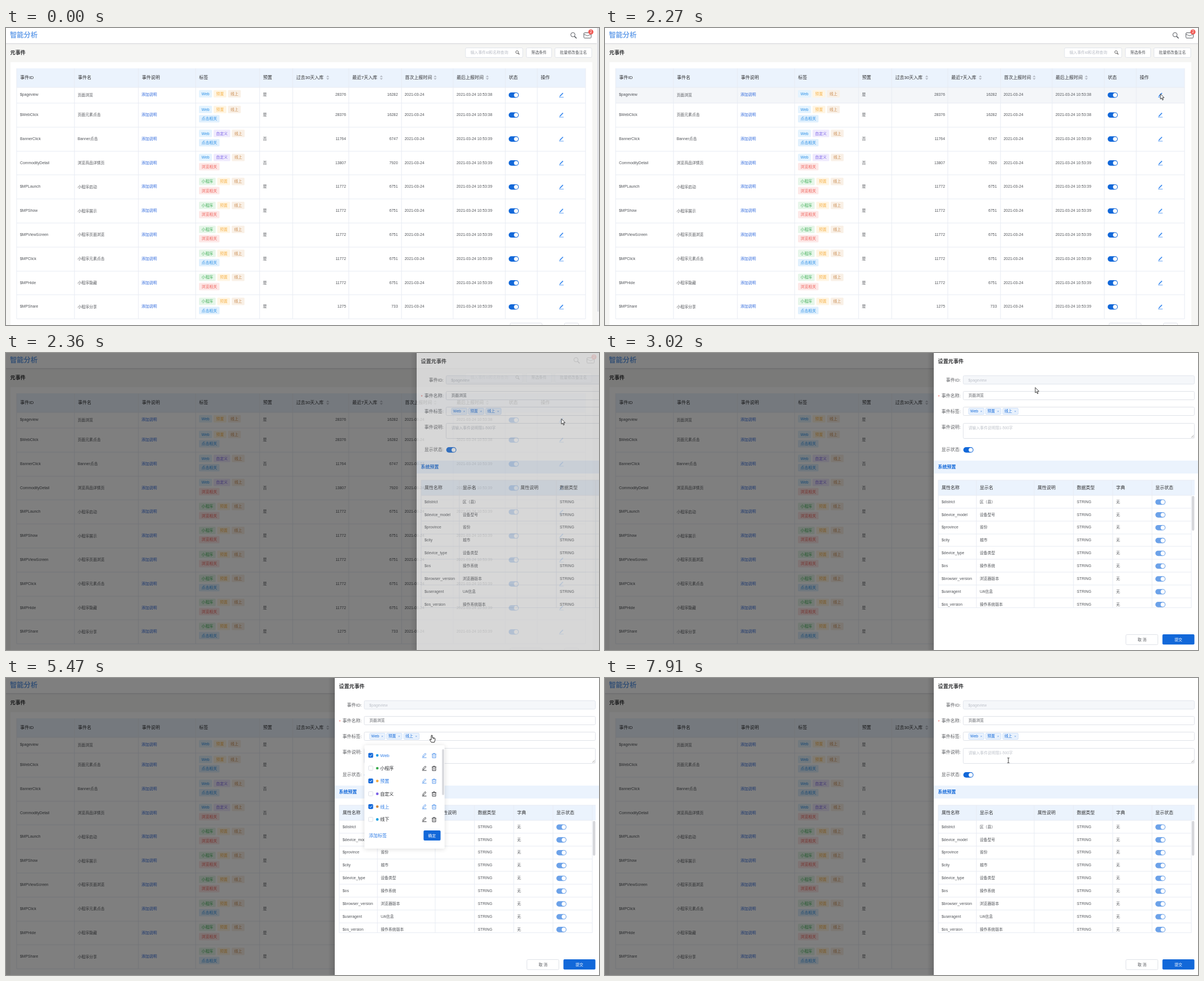
Animation of 1057x530 px, one loop 8 s. Source, as an HTML page with a canvas:

```html
<!DOCTYPE html>
<html lang="zh-CN">
<head>
<meta charset="utf-8">
<title>元事件</title>
<style>
html, body { margin: 0; width: 100%; height: 100%; overflow: hidden; background: #fff; }
canvas { display: block; width: 1057px; height: 530px; }
</style>
</head>
<body>
<canvas id="stage"></canvas>
<script>
const W = 1057, H = 530, LOOP = 8000;
const FONT = '"Liberation Sans","Noto Sans CJK SC","Noto Sans CJK",sans-serif';
const BLUE = '#1268d9', INK = '#52555a', DARK = '#303133', LINE = '#e8ecf3', HEAD = '#ebf3fd';
const SM = 6.86, MD = 8, LG = 9.14;
const dpr = window.devicePixelRatio || 1;

function setup(c) {
  c.width = W * dpr;
  c.height = H * dpr;
  const ctx = c.getContext('2d');
  ctx.scale(dpr, dpr);
  return ctx;
}
const main = setup(document.getElementById('stage'));
const layer = document.createElement('canvas');
const panel = setup(layer);
let g = main;

// ---------- basic shapes ----------
function rect(x, y, w, h, c) { g.fillStyle = c; g.fillRect(x, y, w, h); }

function box(x, y, w, h, fill, stroke, r = 2) {
  g.beginPath();
  g.roundRect(x, y, w, h, r);
  if (fill) { g.fillStyle = fill; g.fill(); }
  if (stroke) { g.strokeStyle = stroke; g.lineWidth = 1; g.stroke(); }
}

function disc(x, y, r, c) {
  g.beginPath();
  g.arc(x, y, r, 0, 7);
  g.fillStyle = c;
  g.fill();
}

function path(pts, c, w = 1, fill) {
  g.beginPath();
  pts.forEach(([x, y]) => g.lineTo(x, y));
  if (fill) { g.closePath(); g.fillStyle = fill; g.fill(); }
  if (c) { g.strokeStyle = c; g.lineWidth = w; g.stroke(); }
}

function text(s, x, y, size, c, align = 'left', weight = 400) {
  g.font = `${weight} ${size}px ${FONT}`;
  g.textAlign = align;
  g.fillStyle = c;
  g.fillText(s, x, y + size * 0.36);
}

function width(s) {
  g.font = `${SM}px ${FONT}`;
  return g.measureText(s).width;
}

// ---------- icons ----------
function toggle(x, y, c) {
  box(x, y - 4.8, 18, 9.6, c, null, 4.8);
  disc(x + 13.2, y, 3.7, '#fff');
}

function magnifier(x, y, r, c, w) {
  g.beginPath();
  g.arc(x, y, r, 0, 7);
  g.strokeStyle = c;
  g.lineWidth = w;
  g.stroke();
  path([[x + r * 0.75, y + r * 0.75], [x + r * 1.7, y + r * 1.7]], c, w * 1.5);
}

function pencil(x, y, c) {
  path([[x - 2.6, y + 2.2], [x + 2.8, y - 3.4]], c, 1.7);
  path([[x - 3.6, y + 3.4], [x - 2, y + 1.6]], c, 0.8);
  path([[x - 4, y + 4], [x + 4, y + 4]], c, 0.8);
}

function editIcon(x, y, c) {
  path([[x - 2.6, y + 2.6], [x - 2.2, y + 0.4], [x + 1.6, y - 3.8], [x + 3.2, y - 2.4], [x - 0.6, y + 2], [x - 2.6, y + 2.6]], c, 0.9);
  path([[x - 3.8, y + 4], [x + 4, y + 4]], c, 0.9);
}

function trash(x, y, c) {
  path([[x - 4, y - 2.5], [x + 4, y - 2.5]], c, 0.9);
  path([[x - 1.4, y - 2.5], [x - 1.4, y - 4], [x + 1.4, y - 4], [x + 1.4, y - 2.5]], c, 0.8);
  path([[x - 3, y - 2.5], [x - 3, y + 4], [x + 3, y + 4], [x + 3, y - 2.5]], c, 0.9);
  path([[x - 1, y - 0.6], [x - 1, y + 2.2]], c, 0.7);
  path([[x + 1, y - 0.6], [x + 1, y + 2.2]], c, 0.7);
}

function sorter(x, y) {
  const c = '#b4b9c3';
  path([[x - 2.7, y - 1], [x, y - 4], [x + 2.7, y - 1]], null, 1, c);
  path([[x - 2.7, y + 1], [x, y + 4], [x + 2.7, y + 1]], null, 1, c);
}

// ---------- cursor ----------
// time, x, y, and the shape shown from then on
const KEYS = [
  [430, 1064, 540, 'arrow'], [640, 1034, 430, 'arrow'], [900, 1006, 250, 'arrow'], [1230, 992, 122, 'arrow'],
  [1290, 992, 122, 'arrow'], [1640, 990, 114, 'arrow'], [1840, 990, 114, 'arrow'], [1900, 988, 111, 'hand'],
  [2200, 988, 111, 'arrow'], [2250, 990, 117.5, 'arrow'], [2480, 990, 117.5, 'arrow'], [2990, 768, 62, 'arrow'],
  [3020, 767, 61.5, 'arrow'], [3140, 755, 69, 'beam'], [3270, 742, 75, 'beam'], [4090, 742, 75, 'beam'],
  [4200, 745, 75.5, 'beam'], [4670, 745, 75.5, 'beam'], [4760, 752, 88, 'hand'], [4910, 759, 102, 'hand'],
  [6110, 759, 102, 'hand'], [6250, 793, 136, 'hand'], [6420, 778, 190, 'hand'], [6630, 734, 246, 'hand'],
  [6800, 756, 267, 'hand'], [6960, 756, 267, 'hand'], [7120, 757, 280, 'hand'], [7420, 757, 280, 'arrow'],
  [7640, 757, 280, 'arrow'], [7820, 722, 158, 'beam'], [7890, 719, 147, 'beam'], [8000, 719, 147, 'beam']
];

function slope(i, k) {
  const a = KEYS[i - 1], b = KEYS[i], c = KEYS[i + 1];
  if (!a || !c || a[k] === b[k] || b[k] === c[k]) return 0;
  return (c[k] - a[k]) / (c[0] - a[0]);
}

function pointer(t) {
  if (t < KEYS[0][0]) return null;
  let i = 0;
  while (i < KEYS.length - 2 && t >= KEYS[i + 1][0]) i++;
  const a = KEYS[i], b = KEYS[i + 1], d = b[0] - a[0], u = (t - a[0]) / d, v = 1 - u;
  const at = k => a[k] * (1 + 2 * u) * v * v + b[k] * u * u * (3 - 2 * u)
    + d * u * v * (slope(i, k) * v - slope(i + 1, k) * u);
  return { x: at(1), y: at(2), shape: a[3] };
}

function drawPointer(p) {
  g.save();
  g.translate(p.x, p.y);
  if (p.shape === 'arrow') {
    path([[0, 0], [0, 9.4], [2.2, 7.5], [3.7, 11.1], [5.2, 10.4], [3.7, 7], [6.6, 6.8], [0, 0]], '#111', 0.8, '#fff');
  } else if (p.shape === 'beam') {
    path([[-2, -4.3], [2, -4.3]], '#333', 0.8);
    path([[-2, 4.3], [2, 4.3]], '#333', 0.8);
    path([[0, -4.3], [0, 4.3]], '#333', 0.9);
  } else {
    path([[-1, 0.6], [0, 0], [1, 0.6], [1, 4.4], [5, 5.2], [6, 6.4], [5.6, 9.6], [4.4, 12.8], [-0.8, 12.8],
      [-3.6, 8.4], [-3.2, 7.2], [-1, 8.4], [-1, 0.6]], '#111', 0.9, '#fff');
    path([[2.4, 5], [2.4, 7]], '#111', 0.6);
    path([[4, 5.2], [4, 7]], '#111', 0.6);
  }
  g.restore();
}

// Paints the hovered row, fading between rows.
function hoverRows(t, rowAt, paint) {
  const sum = {};
  for (let k = 1; k <= 3; k++) {
    const p = pointer(t - 30 * k), i = p ? rowAt(p) : -1;
    if (i >= 0) sum[i] = (sum[i] || 0) + 1 / 3;
  }
  for (const i in sum) {
    g.globalAlpha = sum[i];
    paint(+i);
  }
  g.globalAlpha = 1;
}

// ---------- easing ----------
function ease(u) {
  if (u <= 0) return 0;
  if (u >= 1) return 1;
  let lo = 0, hi = 1, s;
  for (let i = 0; i < 20; i++) {
    s = (lo + hi) / 2;
    const x = 0.75 * s * (1 - s) + s ** 3;
    if (x < u) lo = s; else hi = s;
  }
  return 0.3 * s * (1 - s) ** 2 + 3 * s * s * (1 - s) + s ** 3;
}

// ---------- event list page ----------
const TAGS = {
  'Web': ['#2b8fe6', '#e4f3fe'], '预置': ['#f6b34c', '#fff5e3'], '线上': ['#c98b50', '#f9f0e6'],
  '自定义': ['#7b62e6', '#efeafd'], '小程序': ['#3fae55', '#e6f6e9'],
  '点击相关': ['#2b8fe6', '#e0f0fd'], '浏览相关': ['#ee5f58', '#fde8e7']
};
const COLS = [19, 122, 236, 338, 452, 511, 611, 705, 797, 890, 947, 1033];
const TITLES = ['事件ID', '事件名', '事件说明', '标签', '预置', '过去30天入库', '最近7天入库', '首次上报时间', '最后上报时间', '状态', '操作'];
const EVENTS = [
  '$pageview|页面浏览|Web,预置,线上||28376|16282',
  '$WebClick|页面元素点击|Web,预置,线上|点击相关|28376|16282',
  'BannerClick|Banner点击|Web,自定义,线上|点击相关|11764|6747',
  'CommodityDetail|浏览商品详情页|Web,自定义,线上|浏览相关|13807|7920',
  '$MPLaunch|小程序启动|小程序,预置,线上|浏览相关|11772|6751',
  '$MPShow|小程序展示|小程序,预置,线上|浏览相关|11772|6751',
  '$MPViewScreen|小程序页面浏览|小程序,预置,线上|浏览相关|11772|6751',
  '$MPClick|小程序元素点击|小程序,预置,线上|点击相关|11772|6751',
  '$MPHide|小程序隐藏|小程序,预置,线上|浏览相关|11772|6751',
  '$MPShare|小程序分享|小程序,预置,线上|点击相关|1275|733'
].map(s => s.split('|'));
const rowTop = i => i ? 134 + (i - 1) * 42.8 : 106;

function tags(list, y) {
  let x = 344;
  for (const s of list) {
    const [c, bg] = TAGS[s], w = width(s) + 9.14;
    box(x, y - 6.5, w, 13.2, bg, null, 1.5);
    text(s, x + 4.57, y, SM, c);
    x += w + 2.86;
  }
}

function eventRow(e, i) {
  const top = rowTop(i), y = i ? top + 20.6 : 119;
  text(e[0], 25, y, SM, INK);
  text(e[1], 127.7, y + 0.4, SM, INK);
  text('添加说明', 241.5, y, SM, '#2b66dc');
  tags(e[2].split(','), top + 11.3);
  if (e[3]) tags([e[3]], top + 27.7);
  text(e[2].includes('自定义') ? '否' : '是', 458, y, SM, INK);
  text(e[4], 606, y, SM, INK, 'right');
  text(e[5], 698.5, y, SM, INK, 'right');
  text('2021-03-24', 710.5, y, SM, INK);
  text('2021-03-24 10:53:' + (i < 2 ? 38 : 39), 803, y, SM, INK);
  toggle(896, y + 0.7, BLUE);
  pencil(990, y + 0.5, '#3d8cf0');
}

function page(t) {
  const bar = t < 2230, dx = bar ? 0 : 5.5;
  rect(0, 0, W, H, '#f5f5f3');
  rect(0, 0, W, 27, '#fff');
  rect(0, 27, W, 1, '#dedee0');
  rect(0, 28, W, 1.5, '#ececec');
  text('智能分析', 7, 13, 12.3, '#6ba2ea', 'left', 700);
  magnifier(1010.5 + dx, 12, 3.8, '#55585e', 1);
  box(1030 + dx, 8.5, 13, 9.5, '#fff', '#55585e', 1.5);
  path([[1030 + dx, 11], [1036.5 + dx, 14], [1043 + dx, 11]], '#55585e', 0.9);
  disc(1042.5 + dx, 7, 4.6, '#f05b56');
  text('2', 1042.5 + dx, 7, 6.6, '#fff', 'center');

  text('元事件', 7.5, 43.5, LG, DARK, 'left', 700);
  box(819, 35.5, 102, 17, '#fff', '#e1e4ea');
  text('输入事件id和名称查询', 828, 44, SM, '#b9bdc6');
  magnifier(911, 43, 2.4, '#444', 0.8);
  box(927.5, 35.5, 45, 17, '#fff', '#e1e4ea');
  text('筛选条件', 950, 44, SM, INK, 'center');
  box(978.5, 35.5, 65.5, 17, '#fff', '#e1e4ea');
  text('批量修改备注名', 1011.3, 44, SM, INK, 'center');

  rect(8, 61, 1037, 469, '#fff');
  rect(19, 72, 1014, 34, HEAD);
  if (t < OPEN) {
    hoverRows(t, p => p.x > 1033 || p.y < 106 ? -1 : EVENTS.findLastIndex((e, i) => p.y >= rowTop(i)),
      i => rect(19, rowTop(i), 1014, rowTop(i + 1) - rowTop(i), '#f4f6f9'));
  }
  COLS.forEach(x => rect(x - 0.5, 72, 1, 447, LINE));
  for (let i = 0; i <= 10; i++) rect(19, Math.round(rowTop(i)) - 0.5, 1014, 1, LINE);
  TITLES.forEach((s, i) => text(s, COLS[i] + 6.2, 88.5, MD, DARK));
  [573.5, 669, 765, 858].forEach(x => sorter(x, 88.5));
  EVENTS.forEach(eventRow);
  box(898.5, 526.5, 57, 15, '#fff', '#dfe2e8');
  box(995.5, 526.5, 25, 15, '#fff', '#dfe2e8');

  if (bar) {
    rect(1053, 0, 4, H, '#f4f4f5');
    rect(1054, 0, 2.5, 506, '#dcdde1');
  }
}

// ---------- drawer ----------
const LEFT = 586, OPEN = 2273;
const PCOLS = [594, 662, 765, 835, 905, 975, 1045];
const PTITLES = ['属性名称', '显示名', '属性说明', '数据类型', '字典', '显示状态'];
const PROPS = ['$district|区（县）', '$device_model|设备型号', '$province|省份', '$city|城市', '$device_type|设备类型',
  '$os|操作系统', '$browser_version|浏览器版本', '$useragent|UA信息', '$os_version|操作系统版本'].map(s => s.split('|'));
const STEP = 22.86;

function label(s, y) { text(s + ':', 634, y, MD, '#606266', 'right'); }

function chip(s, x) {
  const w = width(s) + 13.6;
  box(x + 0.5, 98.5, w, 11, '#e9f2fd', '#cfe1f9', 1.5);
  text(s, x + 3.4, 104, SM, BLUE);
  const cx = x + w - 4.6, c = '#6d9fe4';
  path([[cx - 1.3, 102.9], [cx + 1.3, 105.5]], c, 0.7);
  path([[cx + 1.3, 102.9], [cx - 1.3, 105.5]], c, 0.7);
}

function form(t) {
  const focus = t >= 3410 && t < 5200;
  text('设置元事件', 593.5, 15, LG, DARK, 'left', 700);
  label('事件ID', 48);
  box(638.5, 40.5, 412, 15, '#f5f7fa', '#e2e6ed');
  text('$pageview', 647.5, 48.2, SM, '#bfc3cb');
  text('*', 593.5, 77, MD, '#f05b56');
  label('事件名称', 76);
  box(638.5, 68.5, 412, 15, '#fff', focus ? '#2f7de0' : '#dfe2e8');
  text('页面浏览', 647.7, 76, SM, '#55585e');
  const caret = t < 3810 || (t >= 4360 && t < 4890);
  if (focus && caret) rect(675, 71, 1, 10, '#666');
  label('事件标签', 104);
  box(638.5, 96.5, 412, 15, '#fff', '#dfe2e8');
  chip('Web', 647.7);
  chip('预置', 678);
  chip('线上', 708.6);
  label('事件说明', 132.5);
  box(638.5, 125.5, 412, 27, '#fff', '#dfe2e8');
  text('请输入事件说明限1-500字', 647.7, 133.8, SM, '#bfc3cb');
  path([[1045, 151], [1049.5, 146.5]], '#888', 0.7);
  path([[1047.5, 151], [1049.5, 149]], '#888', 0.7);
  label('显示状态', 172.5);
  toggle(638.7, 172.9, BLUE);
}

function propTable(t) {
  rect(LEFT, 192, 471, 23, HEAD);
  text('系统预置', 593.5, 203.6, MD, BLUE, 'left', 700);
  rect(594, 227, 457, 27, HEAD);
  if (t > 7280) {
    hoverRows(t, p => p.y < 254 ? -1 : Math.floor((p.y - 254) / STEP),
      i => rect(594, 254 + i * STEP, 451, STEP, '#f4f6f9'));
  }
  g.save();
  g.beginPath();
  g.rect(590, 226, 467, 229);
  g.clip();
  PCOLS.forEach(x => rect(x - 0.5, 227, 1, 228, LINE));
  rect(594, 226.5, 457, 1, LINE);
  PTITLES.forEach((s, i) => text(s, PCOLS[i] + 6, 240.3, MD, DARK));
  PROPS.forEach(([id, name], i) => {
    const y = 265.3 + i * STEP;
    text(id, 600, y, SM, INK);
    text(name, 668, y, SM, INK);
    text('STRING', 841, y, SM, INK);
    text('无', 911, y, SM, INK);
    toggle(981, y + 0.7, '#6ca2e9');
    rect(594, Math.round(254 + i * STEP) - 0.5, 451, 1, LINE);
  });
  rect(594, 454, 451, 1, LINE);
  g.restore();
  box(1046, 255, 4.4, 62, '#d6d7db', null, 2.2);
}

const OPTIONS = [['Web', '#1c9be8', 1], ['小程序', '#3aab4e', 0], ['预置', '#f6aa3c', 1],
  ['自定义', '#7a60e6', 0], ['线上', '#d0893f', 1], ['线下', '#14a0e0', 0]];

function picker(t) {
  const opening = Math.min(1, Math.max(0, (t - 5200) / 300));
  const closing = Math.min(1, Math.max(0, (t - 7280) / 260));
  const k = (1 - (1 - opening) ** 4) * (1 - closing) ** 3;
  if (k < 0.01) return;
  g.save();
  g.globalAlpha = k;
  g.translate(0, 120);
  g.scale(1, k);
  g.translate(0, -120);
  g.save();
  g.shadowColor = 'rgba(0,0,0,.14)';
  g.shadowBlur = 9 * dpr;
  g.shadowOffsetY = dpr;
  box(638.8, 120, 143, 184.5, '#fff');
  g.restore();
  const p = pointer(t - 90);
  const over = p && p.x > 639 && p.x < 782 ? Math.floor((p.y - 126.6) / STEP) : -1;
  OPTIONS.forEach(([s, c, on], i) => {
    const y = 138.1 + i * STEP;
    if (i === over) rect(639, y - 11.4, 137.5, STEP, '#f3f4f6');
    box(646.3, y - 3.9, 7.6, 7.6, on ? BLUE : '#fff', on ? BLUE : '#dcdfe6', 1);
    if (on) path([[648, y], [649.6, y + 1.7], [652.3, y - 1.8]], '#fff', 1);
    disc(661.8, y, 2.3, c);
    text(s, 667, y + 0.2, MD, on ? '#2f7de6' : '#26282c');
    const ic = on ? '#4a8fea' : '#26282c';
    editIcon(745.5, y, ic);
    trash(763, y + 0.3, ic);
  });
  box(777.2, 127, 3.8, 82, '#d9dade', null, 1.9);
  text('添加标签', 646.7, 281, MD, '#2f7de6');
  const q = pointer(t);
  box(744.3, 272, 30.3, 18, q && q.y > 272 && t > 6960 ? '#418ae4' : BLUE);
  text('确定', 759.4, 281.2, SM, '#fff', 'center', 500);
  g.restore();
}

function drawer(t) {
  rect(LEFT, 0, W - LEFT, H, '#fff');
  form(t);
  propTable(t);
  box(928.5, 502.5, 57, 18, '#fff', '#dfe2e8');
  text('取 消', 957.2, 511.3, SM, INK, 'center');
  box(993.6, 502, 57, 18.3, BLUE);
  text('提交', 1022, 511.3, SM, '#fff', 'center', 500);
  picker(t);
}

// ---------- frame ----------
function draw(t) {
  g = main;
  g.clearRect(0, 0, W, H);
  page(t);
  const slide = ease((t - OPEN) / 217), dim = ease((t - OPEN) / 85);
  if (dim > 0) rect(0, 0, W, H, `rgba(0,0,0,${dim * 0.5})`);
  if (slide > 0) {
    g = panel;
    g.clearRect(0, 0, W, H);
    drawer(t);
    g = main;
    const dx = Math.round((1 - slide) * (W - LEFT));
    g.globalAlpha = slide;
    const shade = g.createLinearGradient(LEFT + dx - 12, 0, LEFT + dx, 0);
    shade.addColorStop(0, 'rgba(0,0,0,0)');
    shade.addColorStop(1, 'rgba(0,0,0,.14)');
    rect(LEFT + dx - 12, 0, 12, H, shade);
    g.drawImage(layer, dx, 0, W, H);
    g.globalAlpha = 1;
  }
  const p = pointer(t);
  if (p) drawPointer(p);
}

const start = performance.now();
function tick() {
  draw((performance.now() - start) % LOOP);
  requestAnimationFrame(tick);
}
tick();
</script>
</body>
</html>
```
